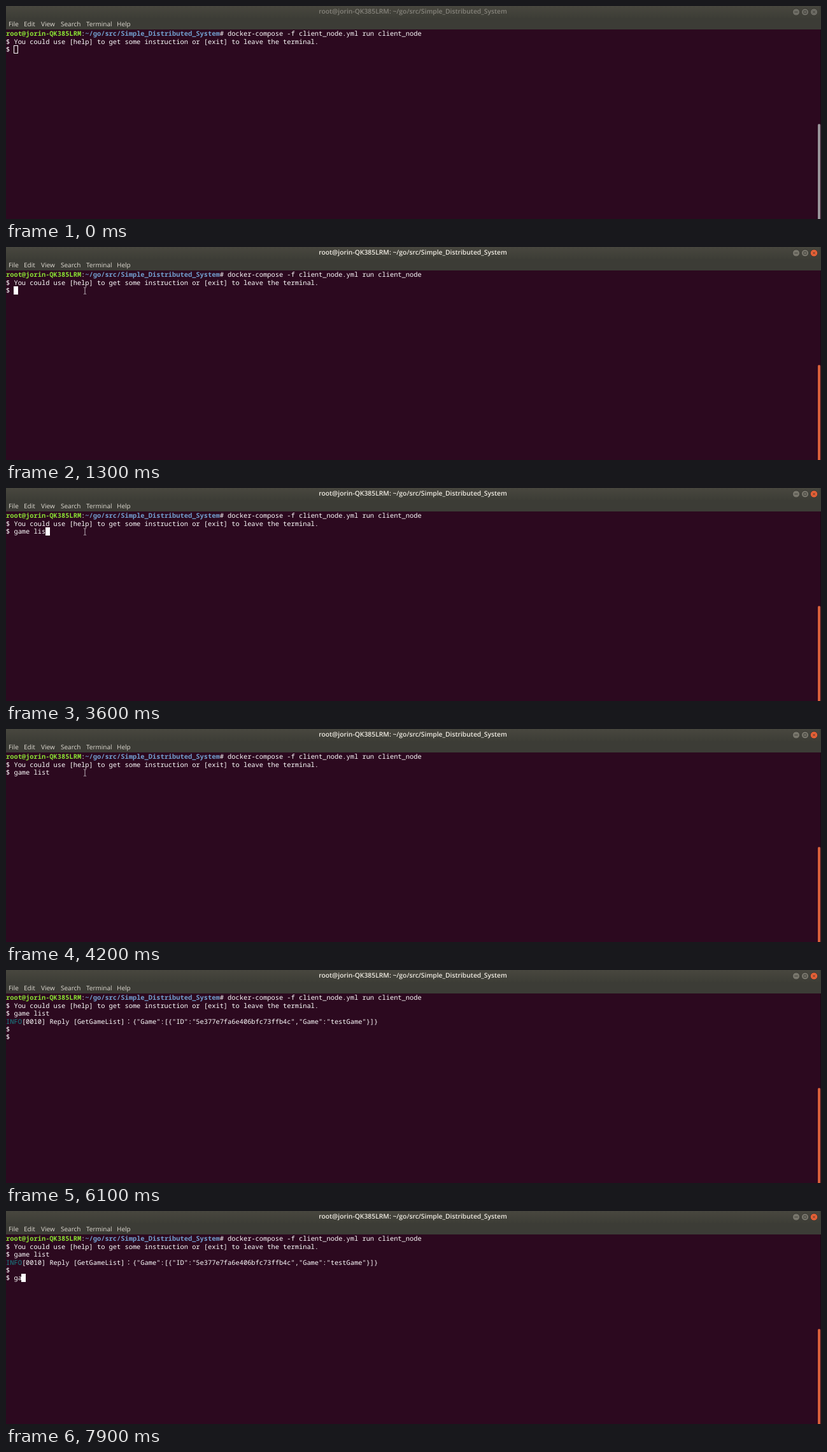
An HTML page that plays this animation: 1280x336 px, repeating every 8 s.

```html
<!DOCTYPE html>
<html lang="ja">
<head>
<meta charset="utf-8">
<title>Terminal</title>
<style>
  html, body { margin: 0; width: 1280px; height: 336px; overflow: hidden; background: #2c091f; }
  body { position: relative; text-rendering: geometricPrecision; }
  body > *, #menu span { position: absolute; }
  #title {
    left: 0; top: 0; width: 1278px; height: 19px; text-align: center;
    background: linear-gradient(#48473f, #3d3d36);
    font: 600 10.33px/19px "Open Sans", "Noto Sans", sans-serif; color: #85837b;
  }
  #edge { left: 1278px; top: 0; width: 2px; height: 19px; background: #3d3d36; }
  #menu {
    left: 0; top: 19px; width: 1280px; height: 18px; background: #3c3c36;
    font: 10px/19px "Open Sans", "Noto Sans", sans-serif; color: #dfdbd2;
  }
  #screen {
    left: 0; top: 38.2px; margin: 0; color: #fff;
    font: 10.37px/12.44px "Noto Sans Mono", "DejaVu Sans Mono", monospace;
  }
  #screen b { color: #8ae234; }
  #screen b + b { color: #729fcf; }
  #screen i { font-style: normal; color: #16848a; }
  #screen u {
    display: inline-block; width: 2ch; height: 12.44px; vertical-align: top;
    text-align: center; text-decoration: none;
  }
  #cursor { box-sizing: border-box; width: 7px; height: 13px; border: 1px solid #fff; }
  #trough { left: 1279px; top: 37px; width: 1px; height: 149px; background: #1b0714; }
  #thumb { left: 1275px; top: 186px; width: 4px; height: 150px; border-radius: 2px 2px 0 0; background: #99959a; }
  #buttons { left: 1230px; top: 0; --face: #6e6d65; --close: #6e6d65; --rim: #35342f; }
  .active #title { color: #f0ece3; }
  .active #thumb { background: #d9603b; }
  .active #buttons { --face: #77756b; --close: #ea6136; }
</style>
</head>
<body>
<div id="title">root@jorin-QK385LRM: ~/go/src/Simple_Distributed_System</div>
<div id="edge"></div>
<div id="menu">
  <span style="left:4px">File</span><span style="left:28px">Edit</span>
  <span style="left:55px">View</span><span style="left:86px">Search</span>
  <span style="left:126px">Terminal</span><span style="left:174px">Help</span>
</div>
<svg id="buttons" width="50" height="19" stroke="var(--rim)" stroke-width=".8" fill="var(--face)">
  <circle cx="11" cy="9.5" r="5.6"/>
  <circle cx="25" cy="9.5" r="5.6"/>
  <circle cx="39" cy="9.5" r="5.6" fill="var(--close)"/>
  <path d="M8.5 9.5h5M23 7.5h4v4h-4zM37 7.5l4 4m0-4l-4 4" fill="none"/>
</svg>
<pre id="screen"></pre>
<div id="cursor"></div>
<div id="trough"></div>
<div id="thumb"></div>
<svg id="pointer" width="14" height="16" style="overflow:visible">
  <path id="arrow" d="M0 0v11l2.6-2.4 1.8 4 1.8-.8-1.8-3.9h3.6z" fill="#111" stroke="#ddd" stroke-width=".7"/>
  <path id="beam" d="M-2-5.2h1.4l.6.7.6-.7h1.4M0-4.5v9M-2 5.2h1.4l.6-.7.6.7h1.4" fill="none" stroke="#d0c8cd" stroke-width=".9"/>
</svg>
<script>
const LOOP = 8000, ROW = 12.44, TOP = 37.3, CELL = 6.222;
const FOCUS = 1200, ACTIVE = 1300, POINTER_IN = 700, POINTER_OUT = 4600;
const $ = id => document.getElementById(id);

const intro = '<b>root@jorin-QK385LRM</b>:<b>~/go/src/Simple_Distributed_System</b># ' +
  'docker-compose -f client_node.yml run client_node\n' +
  '$ You could use [help] to get some instruction or [exit] to leave the terminal.\n$ ';
const reply = '\n<i>INFO</i>[0010] Reply [GetGameList]<u>\uff1a</u>' +
  '{"Game":[{"ID":"5e377e7fa6e406bfc73ffb4c","Game":"testGame"}]}\n$ ';

const output = [
  [1800, 'g'], [1900, 'a'], [2100, 'm'], [2600, 'e'], [2800, ' '],
  [3100, 'l'], [3400, 'i'], [3500, 's'], [3900, 't'], [4600, reply],
  [5700, '\n$ '], [6400, 'g'], [7400, 'a']
];
const blinks = [1800, 2400, 3000, 3600, 4200, 4600, 5100, 5700, 6100, 6700, 7300, 7900];
const path = [[101.5, 22.5], [110, 42], [119, 58], [124, 69]];

let shown = '';
function draw(t) {
  const text = intro + output.filter(([at]) => t >= at).map(([, s]) => s).join('');
  if (text !== shown) $('screen').innerHTML = shown = text;

  const lines = text.split('\n'), cursor = $('cursor').style;
  cursor.left = Math.floor(lines.at(-1).length * CELL) + 'px';
  cursor.top = Math.floor(TOP + (lines.length - 1) * ROW) + 'px';
  cursor.background = t >= FOCUS ? '#fff' : 'none';
  cursor.visibility = blinks.filter(at => t >= at).length % 2 ? 'hidden' : 'visible';
  document.body.className = t >= ACTIVE ? 'active' : '';

  const step = Math.max(0, Math.min(3, Math.floor((t - POINTER_IN) / 100)));
  const [x, y] = path[step], pointer = $('pointer').style;
  pointer.left = x + 'px';
  pointer.top = y + 'px';
  pointer.display = t >= POINTER_IN && t < POINTER_OUT ? 'block' : 'none';
  $('arrow').style.display = step ? 'none' : 'inline';
  $('beam').style.display = step ? 'inline' : 'none';
}

const start = performance.now();
function tick() {
  draw((performance.now() - start) % LOOP);
  requestAnimationFrame(tick);
}
tick();
</script>
</body>
</html>
```
